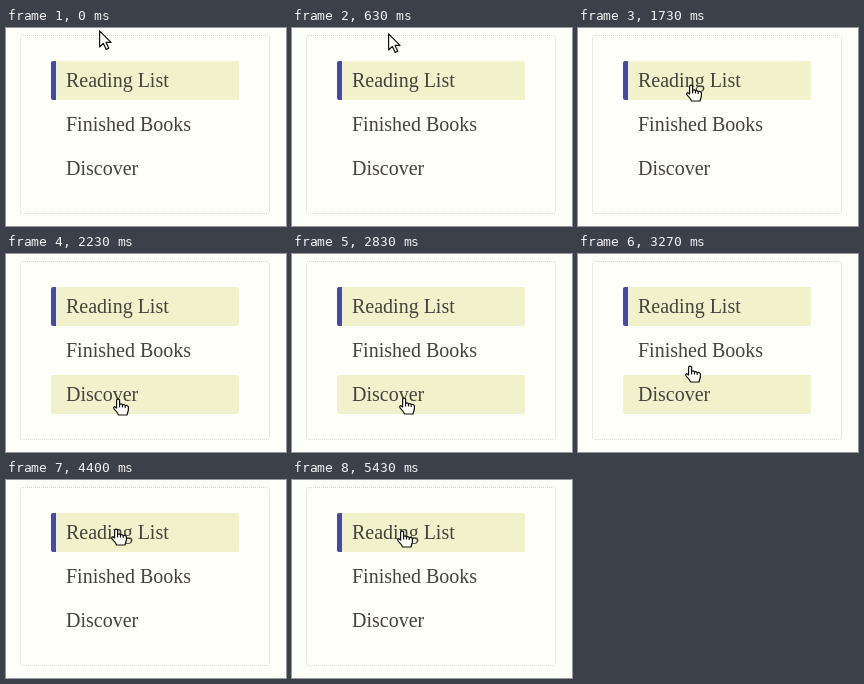
An HTML page that plays this animation: 280 by 198 pixels, repeating every 5460 ms.

```html
<!DOCTYPE html>
<html lang="en">
<head>
<meta charset="utf-8">
<title>Reading list menu</title>
<style>
  html, body { margin: 0; width: 100%; height: 100%; overflow: hidden; background: #fffff9; }
  .stage { position: relative; width: 280px; height: 198px; overflow: hidden; }
  .card {
    position: absolute; left: 14px; top: 7px; width: 250px; height: 179px;
    box-sizing: border-box; border: 1px dotted #d6d6cc; border-radius: 3px;
  }
  .menu { position: absolute; left: 45px; top: 33px; width: 188px; }
  .item {
    height: 39px; margin-bottom: 5px; padding-left: 10px;
    border-left: 5px solid transparent; border-radius: 2px;
    font: 20px/39px "Liberation Serif", "Times New Roman", serif;
    color: #44443c; white-space: nowrap;
  }
  .lit, .active { background: #f1f1cb; }
  .active { border-left-color: #4848a8; }
  svg { position: absolute; left: 0; top: 0; overflow: visible; }
  svg path { fill: #fffffa; stroke: #111; stroke-width: 1.2; stroke-linejoin: round; }
</style>
</head>
<body>
<div class="stage">
  <div class="card"></div>
  <div class="menu">
    <div class="item active">Reading List</div>
    <div class="item">Finished Books</div>
    <div class="item">Discover</div>
  </div>
  <svg id="pointer" width="16" height="21">
    <path id="arrow" d="M.6 .8V17L4.4 13.4L7.2 19.4L9.8 18.2L7.1 12.4H12Z"/>
    <path id="hand" transform="translate(-5 0)"
      d="M3.6 2Q5 .2 6.6 2V9V6.4Q8.4 5.4 9.5 6.8V9V6.8Q11 6 12.2 7.5V9.5V7.5Q14.4 6.8 15.4 8.8V12L14 17H5.6Q4.6 14.6 1.2 11.2Q0 9 1.8 8.6L3.6 10Z"/>
  </svg>
</div>
<script>
  const LOOP = 5460, STEP = 100 / 3, HOVER_LAG = 40;
  const ITEM_TOP = 33, ITEM_HEIGHT = 39, ITEM_PITCH = 44;

  // Where the pointer turns around; it eases from one stop to the next
  const stops = [
    { t: 0, x: 93, y: 2 },
    { t: 600, x: 96, y: 5 },
    { t: 1340, x: 120, y: 91 },
    { t: 1890, x: 112, y: 48 },
    { t: 2233, x: 112, y: 144 },
    { t: 3115, x: 112, y: 143 },
    { t: 3465, x: 112, y: 62 },
    { t: 3833, x: 112, y: 100 },
    { t: 4400, x: 110, y: 48 },
    { t: LOOP, x: 110, y: 50 }
  ];
  const items = [...document.querySelectorAll(".item")];
  const [pointer, arrow, hand] = ["pointer", "arrow", "hand"].map(id => document.getElementById(id));

  const ease = k => (1 - Math.cos(Math.PI * k)) / 2;
  const mix = (a, b, k) => a + (b - a) * k;

  function tipAt(time) {
    const t = Math.max(0, time);
    const next = stops.findIndex(s => s.t > t);
    const a = stops[next - 1], b = stops[next];
    const k = ease((t - a.t) / (b.t - a.t));
    return { x: mix(a.x, b.x, k), y: mix(a.y, b.y, k) };
  }

  function draw(ms) {
    // 30 steps a second; the small offset absorbs times rounded to 10 ms
    const t = Math.floor((ms % LOOP + 4) / STEP) * STEP % LOOP;
    const tip = tipAt(t);
    const offset = tipAt(t - HOVER_LAG).y - ITEM_TOP;
    const hovered = items.map((_, i) =>
      offset >= i * ITEM_PITCH && offset < i * ITEM_PITCH + ITEM_HEIGHT);
    items.forEach((item, i) => item.classList.toggle("lit", hovered[i]));
    const over = hovered.includes(true);
    arrow.style.display = over ? "none" : "";
    hand.style.display = over ? "" : "none";
    pointer.style.transform = `translate(${Math.round(tip.x)}px, ${Math.round(tip.y)}px)`;
  }

  const start = performance.now();
  function tick() {
    draw(performance.now() - start);
    requestAnimationFrame(tick);
  }
  tick();
</script>
</body>
</html>
```
